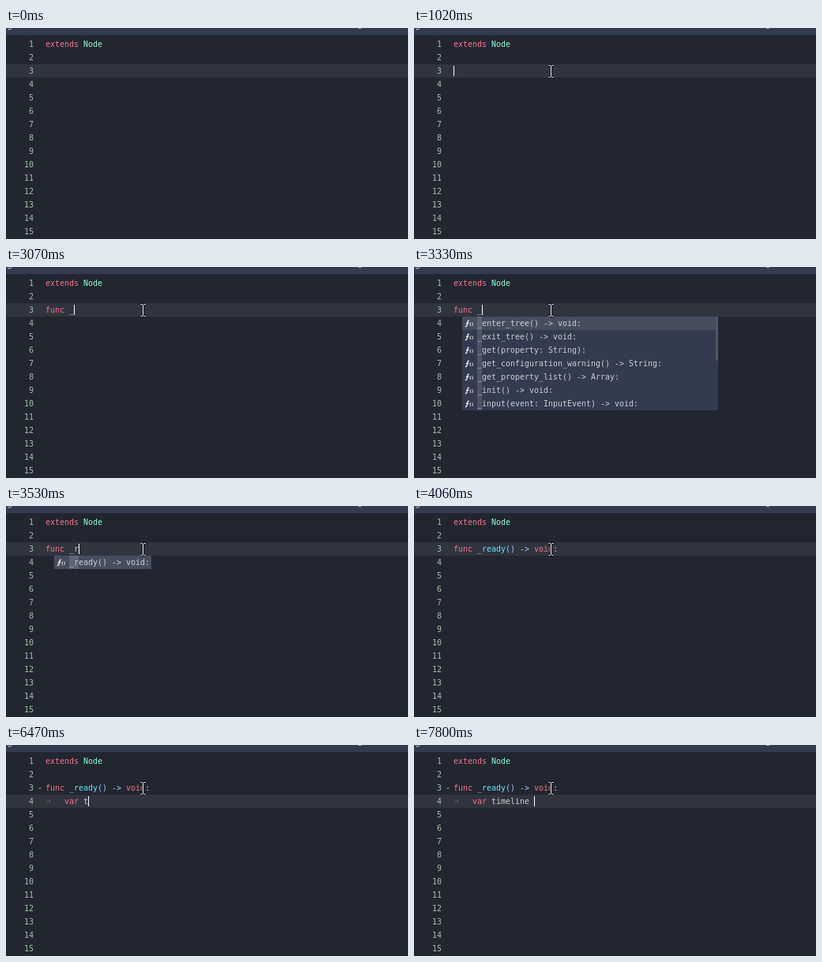
Recreate the animation shown at these times as an HTML page. Size 509 by 268 pixels, loop 8 s.

```html
<!DOCTYPE html>
<html lang="en">
<head>
<meta charset="utf-8">
<title>Script editor</title>
<style>
  html, body { margin: 0; width: 100%; height: 100%; overflow: hidden; background: #222631; }
  svg { display: block; width: 509px; height: 268px; }
  text { font: 9.97px "DejaVu Sans Mono", "Noto Sans Mono", monospace; white-space: pre; fill: #cdcfd2; }
  .num { text-anchor: end; fill: #a2c3aa; }
  .keyword { fill: #ff7085; }
  .type { fill: #8fffdb; }
  .def { fill: #66e6ff; }
  .symbol { fill: #abc9ff; }
  .icon { fill: none; stroke: #e0e0e0; }
</style>
</head>
<body>
<svg viewBox="0 0 509 268">
  <rect width="509" height="268" fill="#222631"/>
  <rect width="509" height="9" fill="#333b4f"/>
  <path d="M2.5 1.5q3 2 4.5-1.5M446 0q2 .8 4 0" fill="none" stroke="#d5d8de"/>
  <rect id="line" width="509" height="17" fill="#30343f"/>
  <g id="numbers"></g>
  <path id="fold" d="M40.5 53.5l2.2 2.5 2.2-2.5" fill="none" stroke="#8a8e97"/>
  <path id="tab" d="M51.5 69l2.5 2.5-2.5 2.5M55.5 69v5" fill="none" stroke="#555965"/>
  <g id="code"></g>
  <rect id="caret" width="1" height="13" fill="#fff"/>
  <g id="popup"></g>
  <g id="mouse" fill="none">
    <path id="beam" d="M-3 -7.5h2l1 1 1-1h2M0 -6.5v13M-3 7.5h2l1-1 1 1h2" stroke="#15171e" stroke-width="2.6"/>
    <use href="#beam"/>
    <path d="M-3 -7.5h2l1 1 1-1h2M0 -6.5v13M-3 7.5h2l1-1 1 1h2" stroke="#fff"/>
  </g>
</svg>
<script>
const LOOP = 8000, LEFT = 50, CHAR = 6, ROW = 17, TAB = 4;
const $ = id => document.getElementById(id);
const rowTop = n => 12 + ROW * (n - 1);
const baseline = n => rowTop(n) + 12;

const TYPED = [
  [1980, "f"], [2180, "u"], [2280, "n"], [2380, "c"], [2790, " "], [3070, "_"],
  [3530, "r"], [3600, "e"], [3990, "ady() -> void:"], [4470, "\n\t"],
  [5190, "v"], [5260, "a"], [5460, "r"], [5790, " "],
  [6470, "t"], [6540, "i"], [6740, "m"], [6870, "e"], [7070, "l"],
  [7340, "i"], [7440, "n"], [7530, "e"], [7800, " "]
];
const CARET_OFF = [[0, 1020], [1510, 1980], [4060, 4470], [4930, 5190], [6320, 6470]];
const METHODS = [
  "_enter_tree() -> void:", "_exit_tree() -> void:", "_get(property: String):",
  "_get_configuration_warning() -> String:", "_get_property_list() -> Array:",
  "_init() -> void:", "_input(event: InputEvent) -> void:"
];
const TOKEN = /(?<keyword>\b(?:extends|func|void|var)\b)|(?<type>\bNode\b)|(?<def>\w+(?=\())|(?<symbol>[():>-]+)|\w+|\s+/g;

const escape = s => s.replace(/>/g, "&gt;");
const rect = (x, y, w, h, fill) =>
  `<rect x="${x}" y="${y}" width="${w}" height="${h}" fill="${fill}"/>`;
const label = (x, n, body, cls = "") =>
  `<text x="${x}" y="${baseline(n)}" class="${cls}">${body}</text>`;

function highlight(s) {
  let out = "";
  for (const m of s.matchAll(TOKEN)) {
    const cls = Object.keys(m.groups).find(k => m.groups[k]) || "";
    out += `<tspan class="${cls}">${escape(m[0])}</tspan>`;
  }
  return out;
}

function popup(items, matched, width, scroll) {
  const x = 61, top = rowTop(4);
  let out = rect(x, top, width, ROW * items.length, "#333b4f") + rect(x, top, width, ROW, "#474d5d");
  items.forEach((item, i) => {
    const y = top + ROW * i;
    out += rect(80, y, CHAR * matched, ROW, "rgba(255,255,255,.13)")
      + `<g class="icon" transform="translate(64 ${y + 4})">`
      + `<path d="M.8 8.5q2 .4 2.4-2.4l.6-3q.3-2.2 2.2-1.8M1.8 4.5h3.6" stroke-width="1.5"/>`
      + `<path d="M7.6 3.5q-1.1 2.2 0 4.5M9.8 3.5q1.2 2.2 0 4.5"/></g>`
      + label(80, 4 + i, escape(item));
  });
  if (scroll) out += rect(x + width - 3, top, 3, 56, "#505767");
  return out;
}

function popupAt(t) {
  if (t < 3330 || t >= 3990) return "";
  if (t < 3530) return popup(METHODS, 1, 324, true);
  return popup(["_ready() -> void:"], t < 3600 ? 2 : 3, 123, false);
}

// The pointer glides in with an ease-out and rises slightly above its rest point.
function moveMouse(t) {
  const u = Math.min(1, Math.floor((t - 220) / 72.7) / 10);
  const e = 1 - (1 - u) ** 3;
  const x = Math.round(406 - 233 * e) + 0.5;
  const y = Math.round(208 - 153 * e - 14 * Math.sin(Math.PI * u));
  $("mouse").setAttribute("visibility", t < 220 ? "hidden" : "visible");
  if (t >= 220) $("mouse").setAttribute("transform", `translate(${x} ${y})`);
}

const show = (id, on) => $(id).setAttribute("visibility", on ? "visible" : "hidden");
const cache = {};
function fill(id, html) {
  if (cache[id] !== html) $(id).innerHTML = cache[id] = html;
}

function render(t) {
  const typed = TYPED.filter(k => k[0] <= t).map(k => k[1]).join("");
  const lines = typed.split("\n").map(s => s.replace("\t", " ".repeat(TAB)));
  const row = 2 + lines.length;

  fill("code", label(LEFT, 1, highlight("extends Node"))
    + lines.map((s, i) => label(LEFT, 3 + i, highlight(s))).join(""));
  fill("popup", popupAt(t));

  $("line").setAttribute("y", rowTop(row));
  $("caret").setAttribute("x", LEFT + CHAR * lines.at(-1).length);
  $("caret").setAttribute("y", rowTop(row) + 2);
  show("caret", !CARET_OFF.some(([a, b]) => t >= a && t < b));
  show("tab", row === 4);
  show("fold", t >= 5190);
  moveMouse(t);
}

$("numbers").innerHTML = Array.from({ length: 15 }, (_, i) => label(35, i + 1, i + 1, "num")).join("");

const start = performance.now();
function tick() {
  render((performance.now() - start) % LOOP);
  requestAnimationFrame(tick);
}
tick();
</script>
</body>
</html>
```
